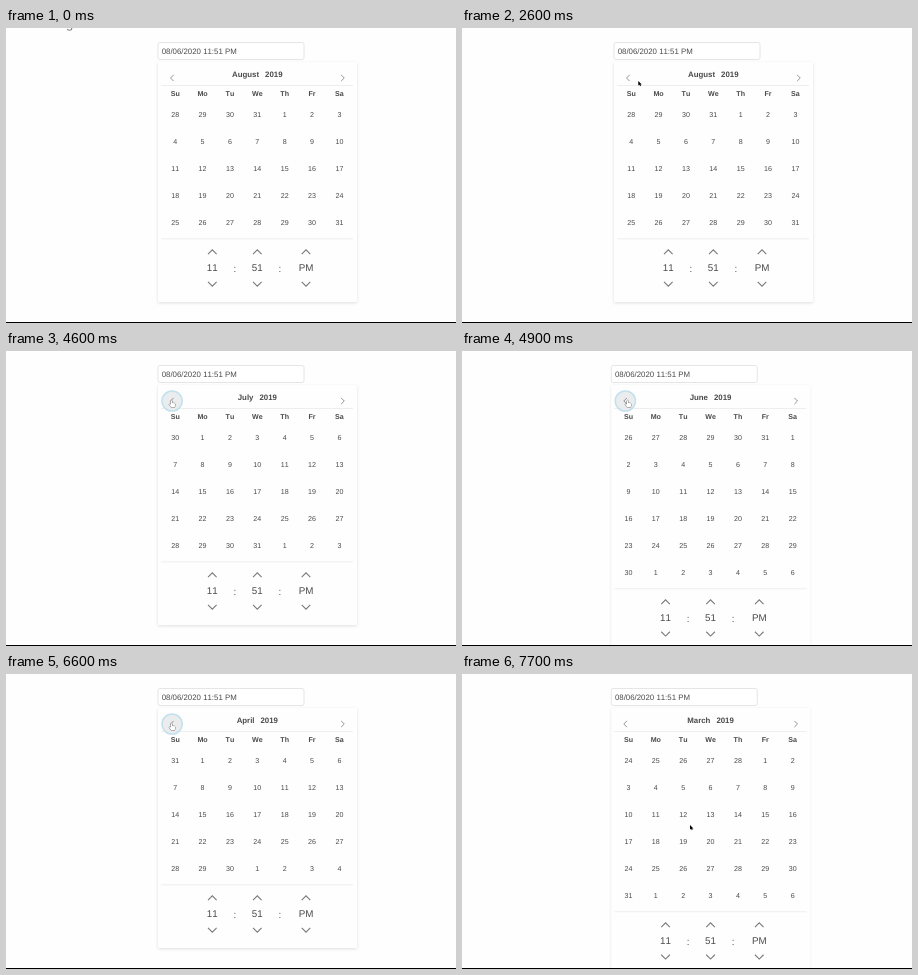
An HTML page with a canvas for the animation above (8000 ms loop, 450 by 295 pixels).

```html
<!DOCTYPE html>
<html lang="en">
<head>
<meta charset="utf-8">
<title>Date picker</title>
<style>
  html, body { margin: 0; width: 100%; height: 100%; overflow: hidden; background: #fefefe; }
  canvas { display: block; width: 450px; height: 295px; }
</style>
</head>
<body>
<canvas></canvas>
<script>
const W = 450, H = 295, LOOP = 8000, STEP = 100;
const canvas = document.querySelector('canvas');
const ctx = canvas.getContext('2d');
const ratio = window.devicePixelRatio || 1;
canvas.width = W * ratio;
canvas.height = H * ratio;

const INK = '#4a4a4a', ICON = '#7a7a7a', LINE = '#eee', PAPER = '#fefefe';
const YEAR = 2019, FIRST_MONTH = 7;
const CENTER = 251.3, COLUMN = 27.37, ROW = 26.9;
const ARROW = new Path2D('M0 0V4.6L1.1 3.7 1.9 5.2 2.7 4.8 2 3.4H3.5Z');
const HAND = new Path2D('M-.7 4.5V.6Q0-.4.7.6V2.7L2.9 3.1Q3.8 3.4 3.6 4.6L3 7.1H-.4L-2.4 4.4Q-2.3 3.4-1.4 3.8Z');

const SHOW = 500, HOVER = 4000, FOCUS = 4300, BLUR = 7000;
const CLICKS = [4400, 4700, 5100, 6400, 6900];

const BUTTON = { x: 165.6, y: 49.2 };
const NEAR = { x: 176.3, y: 53 };
const LEGS = [
  { start: 1500, end: 2000, to: { x: 258, y: 93 } },
  { start: 2000, end: 2600, to: NEAR },
  { start: 3300, end: 3700, to: BUTTON },
  { start: 5400, end: 5700, to: { x: 181.5, y: 57 } },
  { start: 5900, end: 6200, to: BUTTON },
  { start: 6900, end: 7000, to: { x: 174.5, y: 51.6 } },
  { start: 7000, end: 7500, to: { x: 228, y: 151 } }
];

const mix = (a, b, k) => a + (b - a) * k;
const progress = (t, start, end) => Math.min(1, Math.max(0, (t - start) / (end - start)));
const ease = k => k * k * (3 - 2 * k);

// A wide clockwise sweep around the page, then eased legs between places.
function pointerAt(t) {
  const angle = mix(0.8, 5.5, ease(progress(t, 600, 1500)));
  const sweep = { x: 163 + 52 * Math.cos(angle), y: 160 + 115 * Math.sin(angle) };
  return LEGS.reduce((from, { start, end, to }) => {
    const k = ease(progress(t, start, end));
    return { x: mix(from.x, to.x, k), y: mix(from.y, to.y, k) };
  }, sweep);
}

function setFont(size, bold) {
  ctx.font = `${bold ? 'bold ' : ''}${size}px "Liberation Sans", Arial, sans-serif`;
}

function text(str, x, y, size, { bold = false, align = 'center', color = INK } = {}) {
  setFont(size, bold);
  ctx.textAlign = align;
  ctx.fillStyle = color;
  ctx.fillText(str, x, y);
}

function strokePath(color, width) {
  ctx.strokeStyle = color;
  ctx.lineWidth = width;
  ctx.stroke();
}

function chevron(x, y, size, turns, width) {
  ctx.save();
  ctx.translate(x, y);
  ctx.rotate(turns * Math.PI * 2);
  ctx.beginPath();
  ctx.moveTo(-size, size / 2);
  ctx.lineTo(0, -size / 2);
  ctx.lineTo(size, size / 2);
  strokePath(ICON, width);
  ctx.restore();
}

function rule(y) {
  ctx.fillStyle = LINE;
  ctx.fillRect(155, y, 192, 1);
}

function title(month, y) {
  const size = 7.85, gap = 6, style = { bold: true, align: 'left' };
  const name = new Date(YEAR, month).toLocaleString('en', { month: 'long' });
  setFont(size, true);
  const nameWidth = ctx.measureText(name).width;
  const left = CENTER - (nameWidth + gap + ctx.measureText(YEAR).width) / 2;
  text(name, left, y, size, style);
  text(YEAR, left + nameWidth + gap, y, size, style);
}

function input() {
  ctx.beginPath();
  ctx.roundRect(152, 14.5, 146, 17, 2);
  ctx.fillStyle = '#fff';
  ctx.fill();
  strokePath('#dfdfdf', 0.8);
  text('08/06/2020 11:51 PM', 155.7, 25.5, 7.85, { align: 'left' });
}

function panel(height) {
  ctx.save();
  ctx.shadowColor = 'rgba(10,10,10,.13)';
  ctx.shadowBlur = 3 * ratio;
  ctx.shadowOffsetY = ratio;
  ctx.fillStyle = PAPER;
  ctx.fillRect(152, 34, 199, height);
  ctx.restore();
}

function highlight(t) {
  if (t < HOVER || t >= BLUR) return;
  ctx.beginPath();
  ctx.arc(166.1, 50, 10.1, 0, 7);
  ctx.fillStyle = '#ebeced';
  ctx.fill();
  if (t >= FOCUS) strokePath('#c3e0ee', 1.5);
}

function days(month) {
  const first = new Date(YEAR, month, 1).getDay();
  const count = new Date(YEAR, month + 1, 0).getDate();
  const cells = Math.ceil((first + count) / 7) * 7;
  return Array.from({ length: cells }, (_, i) => new Date(YEAR, month, 1 - first + i).getDate());
}

function clock(y) {
  const spinner = (value, x) => {
    text(value, x, y + 3.3, 9.8);
    chevron(x, y - 16, 4.3, 0, 1.1);
    chevron(x, y + 16, 4.3, 0.5, 1.1);
  };
  spinner('11', CENTER - 45);
  spinner('51', CENTER);
  spinner('PM', CENTER + 48.7);
  for (const side of [-1, 1]) text(':', CENTER + side * 22.5, y + 3.8, 9.8);
}

function calendar(month, t) {
  const dates = days(month);
  const tall = dates.length > 35;
  const clockY = tall ? 240 + ROW : 240;
  const column = i => CENTER + (i % 7 - 3) * COLUMN;
  ctx.save();
  if (tall) ctx.translate(-2.75, 0); // the page scrollbar nudges the layout
  input();
  panel(clockY);
  rule(57);
  highlight(t);
  chevron(166.1, 50, 3.1, -0.25, 0.8);
  chevron(336.7, 50, 3.1, 0.25, 0.8);
  title(month, 49.2);
  'Su Mo Tu We Th Fr Sa'.split(' ').forEach((name, i) => text(name, column(i), 68.2, 7.1, { bold: true }));
  dates.forEach((date, i) => text(date, column(i), 89.4 + Math.floor(i / 7) * ROW, 7.1));
  rule(clockY - 29.6);
  clock(clockY);
  ctx.restore();
}

function cursor(t) {
  const { x, y } = pointerAt(t);
  const hand = Math.hypot(x - BUTTON.x, y - BUTTON.y) < 10.5;
  const shape = hand ? HAND : ARROW;
  ctx.save();
  ctx.translate(x, y);
  ctx.lineJoin = 'round';
  ctx.lineWidth = 0.7;
  ctx.strokeStyle = hand ? '#555' : '#fff';
  ctx.fillStyle = hand ? '#fff' : '#000';
  ctx.stroke(shape);
  ctx.fill(shape);
  ctx.restore();
}

function draw(now) {
  const t = Math.floor((now % LOOP) / STEP) * STEP;
  const month = FIRST_MONTH - CLICKS.filter(click => click <= t).length;
  ctx.setTransform(ratio, 0, 0, ratio, 0, 0);
  ctx.textRendering = 'geometricPrecision';
  ctx.fontKerning = 'none';
  ctx.fillStyle = PAPER;
  ctx.fillRect(0, 0, W, H);
  if (t < SHOW) text('g', 63.5, -0.2, 13, { color: ICON });
  calendar(month, t);
  ctx.fillStyle = '#000';
  ctx.fillRect(0, 294, W, 1);
  if (t >= SHOW) cursor(t);
  requestAnimationFrame(draw);
}
requestAnimationFrame(draw);
</script>
</body>
</html>
```
